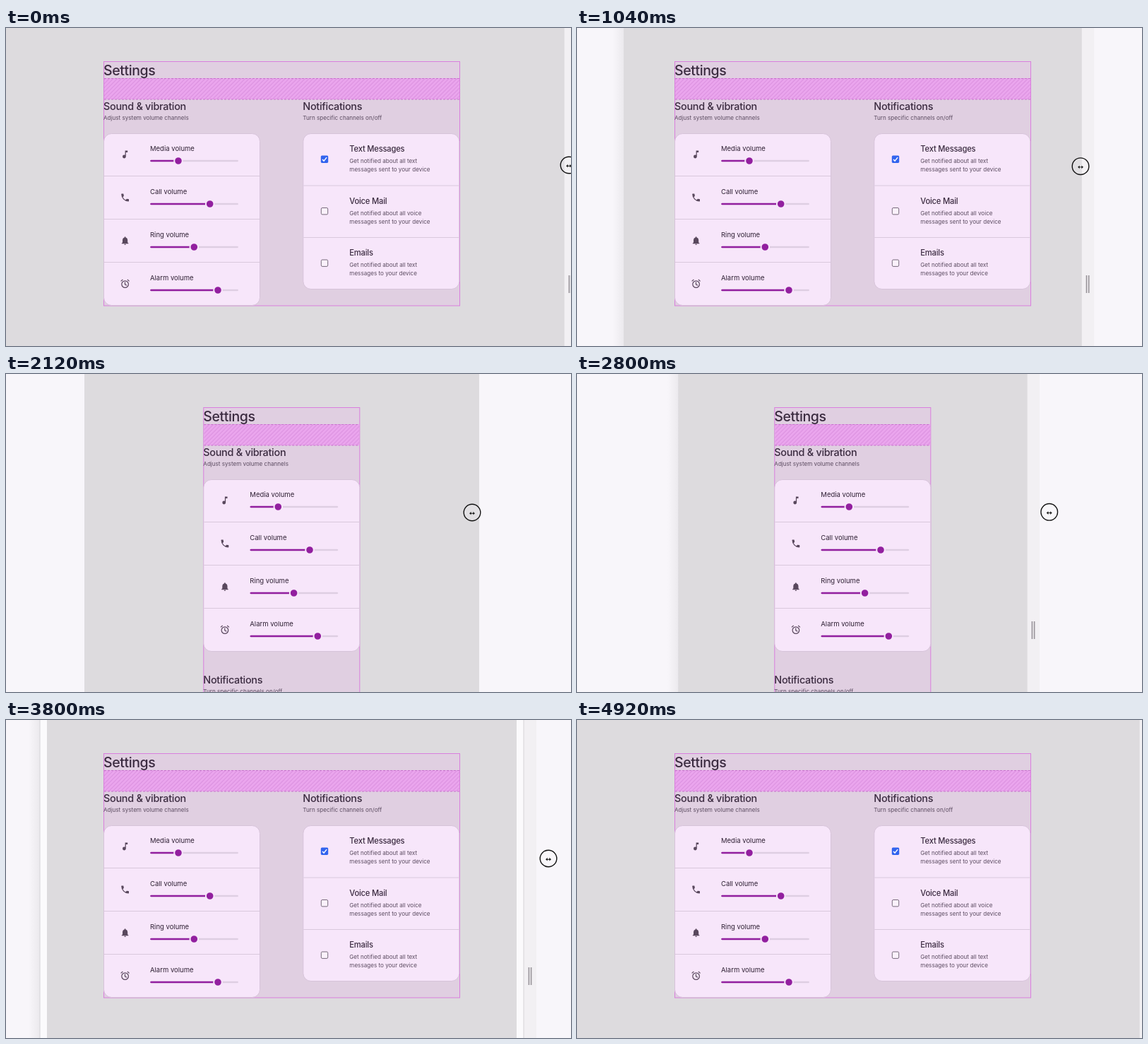
An HTML page for the animation above (4.96 s loop, 800 px wide and 450 px high).

```html
<!DOCTYPE html>
<html lang="en">
<head>
<meta charset="utf-8">
<title>Responsive settings</title>
<style>
  html, body { margin: 0; width: 100%; height: 100%; overflow: hidden; background: #f8f6fa; }
  svg { display: block; width: 100%; height: 100%; }
  text { font-family: Inter, Roboto, sans-serif; fill: #3b2b40; }
  .h1 { font-size: 19.5px; font-weight: 500; letter-spacing: -.02em; }
  .h2 { font-size: 14.4px; font-weight: 500; letter-spacing: -.019em; }
  .h3 { font-size: 11.2px; font-weight: 500; letter-spacing: -.018em; }
  .label { font-size: 9.5px; fill: #2f2034; }
  .small { font-size: 8.1px; fill: #5c4c61; }
  .card { fill: #f7e6fa; stroke: #d6c3d9; }
  .rule { stroke: #d9c8dc; }
  .icon { fill: #59485d; }
  .line { fill: none; stroke: #59485d; stroke-width: 2; }
  .track { stroke: #decee2; stroke-width: 2.6; stroke-linecap: round; }
  .fill { stroke: #921f9f; stroke-width: 2.6; stroke-linecap: round; }
  .thumb { fill: #921f9f; stroke: #f7e6fa; stroke-width: 2; }
  .box { fill: #fbf1fc; stroke: #76697a; }
  .dash { stroke: #c873cd; stroke-dasharray: 3 2; }
</style>
</head>
<body>
<svg viewBox="0 0 800 450" preserveAspectRatio="none">
  <defs>
    <linearGradient id="shade">
      <stop offset="0" stop-color="#f8f6fa"/>
      <stop offset="1" stop-color="#ebe9ed"/>
    </linearGradient>
    <pattern id="hatch" width="4" height="4" patternUnits="userSpaceOnUse" patternTransform="rotate(45)">
      <path d="M.5 0V4" stroke="#d78bdc" stroke-width=".8"/>
    </pattern>
  </defs>

  <rect width="800" height="450" fill="#f8f6fa"/>
  <rect id="shadow" width="16" height="450" fill="url(#shade)"/>
  <g id="grip">
    <rect width="18" height="450" fill="#f2f0f3"/>
    <path d="M7.4 350v25M10.6 350v25" stroke="#989399" stroke-width="1.6"/>
  </g>
  <rect id="outer" y="-2" height="454" fill="#fbfafc" stroke="#d5d3d7"/>
  <rect id="inner" height="450" fill="#dddbde"/>

  <g id="panel">
    <rect id="area" x=".5" y="47.5" fill="#e0cfe1" stroke="#d97fdd"/>
    <rect class="gap" x="1" y="71" height="30" fill="#eaa5ed"/>
    <rect class="gap" x="1" y="71" height="30" fill="url(#hatch)"/>
    <path id="edges" class="dash"/>
    <text class="h1" y="66.5">Settings</text>
    <text class="h2" y="115.7">Sound &amp; vibration</text>
    <text class="small" y="130">Adjust system volume channels</text>
    <rect class="card" x=".5" y="149.5" width="221" height="243" rx="11"/>
    <g id="sliders"></g>
    <g id="notes">
      <text class="h2" y="115.7">Notifications</text>
      <text class="small" y="130">Turn specific channels on/off</text>
      <rect class="card" x=".5" y="149.5" width="221" height="220" rx="11"/>
      <g id="checks"></g>
    </g>
  </g>

  <g id="cursor">
    <circle r="11.8" fill="#fff" fill-opacity=".15" stroke="#111" stroke-width="1.4"/>
    <path d="M-4.2 1.2l3-2.6v1.9h2.4v-1.9l3 2.6-3 2.6v-1.9h-2.4v1.9z" fill="#111" stroke="#fff" stroke-width=".4"/>
  </g>
</svg>
<script>
const $ = id => document.getElementById(id);
const set = (el, attrs) => { for (const k in attrs) el.setAttribute(k, attrs[k]); };

const icons = [
  '<path class="icon" d="M12 3v10.55c-.59-.34-1.27-.55-2-.55a4 4 0 1 0 4 4V7h4V3z"/>',
  '<path class="icon" d="M6.62 10.79a15.1 15.1 0 0 0 6.59 6.59l2.2-2.2a1 1 0 0 1 1.02-.24 11.4 11.4 0 0 0 3.57.57 1 1 0 0 1 1 1V20a1 1 0 0 1-1 1A17 17 0 0 1 3 4a1 1 0 0 1 1-1h3.5a1 1 0 0 1 1 1 11.4 11.4 0 0 0 .57 3.57 1 1 0 0 1-.25 1.02z"/>',
  '<path class="icon" d="M12 22a2 2 0 0 0 2-2h-4a2 2 0 0 0 2 2zm6-6v-5c0-3.07-1.64-5.64-4.5-6.32V4a1.5 1.5 0 0 0-3 0v.68C7.63 5.36 6 7.92 6 11v5l-2 2v1h16v-1z"/>',
  '<g class="line"><circle cx="12" cy="13" r="8"/><path d="M11.8 8v5.4l4.2 2.5M2 5.9l4.6-3.8M22 5.9l-4.6-3.8"/></g>'
];
const volumes = [['Media', 106], ['Call', 150.7], ['Ring', 128.3], ['Alarm', 162]];
const channels = [
  ['Text Messages', 'all text', 'sent to your device'],
  ['Voice Mail', 'all voice', 'sent to your device'],
  ['Emails', 'all text', 'to your device']
];
const rule = i => i ? '<path class="rule" d="M1 149.5H221"/>' : '';

$('sliders').innerHTML = volumes.map(([name, x], i) => `
  <g transform="translate(0 ${i * 61})">${i ? '<path class="rule" d="M1 148.5H221"/>' : ''}
    <g transform="translate(23.4 171.8) scale(.6)">${icons[i]}</g>
    <text class="label" x="66" y="173.5">${name} volume</text>
    <path class="track" d="M68 188H189.5"/><path class="fill" d="M67.5 188H${x}"/>
    <circle class="thumb" cx="${x}" cy="188" r="5.8"/>
  </g>`).join('');

$('checks').innerHTML = channels.map(([name, about, rest], i) => `
  <g transform="translate(0 ${i * 73.5})">${rule(i)}
    ${i ? '<rect class="box" x="26" y="181" width="9.4" height="9.4" rx="1.6"/>'
        : '<rect x="25.5" y="180.5" width="10.4" height="10.4" rx="1.6" fill="#3264ee"/><path d="M27.7 185.9l2.1 2.2 4-5" fill="none" stroke="#fff" stroke-width="1.5"/>'}
    <text class="h3" x="66" y="175.3">${name}</text>
    <text class="small" x="66" y="191.4">Get notified about ${about}</text>
    <text class="small" x="66" y="203.4">messages ${rest}</text>
  </g>`).join('');

// Right-hand positions as [ms, x]; the frame is mirrored about its centre.
const shrink = [[0, 790], [560, 790], [680, 764], [1120, 703], [1480, 687.5], [1680, 679]];
const frameKeys = [...shrink, [2120, 652], [2240, 642], [2360, 637], [2840, 637], [3160, 675],
  [3400, 698], [3800, 733], [3960, 745], [4520, 792], [4920, 796]];
const pageKeys = [...shrink, [2120, 670], [2240, 642], [2360, 637], [2840, 637], [3160, 675],
  [3400, 694], [3800, 723], [3960, 741], [4520, 792], [4920, 796]];
const cursorKeys = [[0, 797], [680, 731], [1480, 691], [2120, 660], [2200, 656], [2400, 656],
  [2840, 670], [3160, 708.5], [3400, 731], [3800, 768], [3960, 778], [4300, 813], [4920, 840]];
const heightKeys = [[0, 194], [680, 195.5], [2120, 196], [3160, 195], [3800, 196]];

function at(keys, t) {
  const i = keys.findIndex(k => k[0] > t);
  if (i < 0) return keys[keys.length - 1][1];
  const [t0, a] = keys[i - 1], [t1, b] = keys[i];
  return a + (b - a) * (t - t0) / (t1 - t0);
}

const LOOP = 4960, STEP = 40, SUM = 781, MIN_WIDE = 672.5;
let wasWide;

function layout(wide) {
  if (wide === wasWide) return;
  wasWide = wide;
  const w = wide ? 504 : 221;
  set($('panel'), { transform: `translate(${wide ? 138 : 279.3} 0)` });
  set($('notes'), { transform: wide ? 'translate(282.3 0)' : 'translate(0 322)' });
  set($('area'), { width: w, height: wide ? 345.5 : 620 });
  set($('edges'), { d: `M1 71.5h${w - 1}M1 101h${w - 1}` });
  document.querySelectorAll('.gap').forEach(el => set(el, { width: w - 1 }));
}

function draw(now) {
  const t = Math.floor(now % LOOP / STEP) * STEP;
  const frame = at(frameKeys, t), page = at(pageKeys, t);
  set($('outer'), { x: SUM - frame, width: 2 * frame - SUM });
  set($('inner'), { x: SUM - page, width: 2 * page - SUM });
  set($('shadow'), { x: SUM - frame - 16 });
  set($('grip'), { transform: `translate(${frame} 0)` });
  set($('cursor'), { transform: `translate(${at(cursorKeys, t)} ${at(heightKeys, t)})` });
  layout(page >= MIN_WIDE);
}

const start = performance.now();
function tick() {
  draw(performance.now() - start);
  requestAnimationFrame(tick);
}
tick();
</script>
</body>
</html>
```
